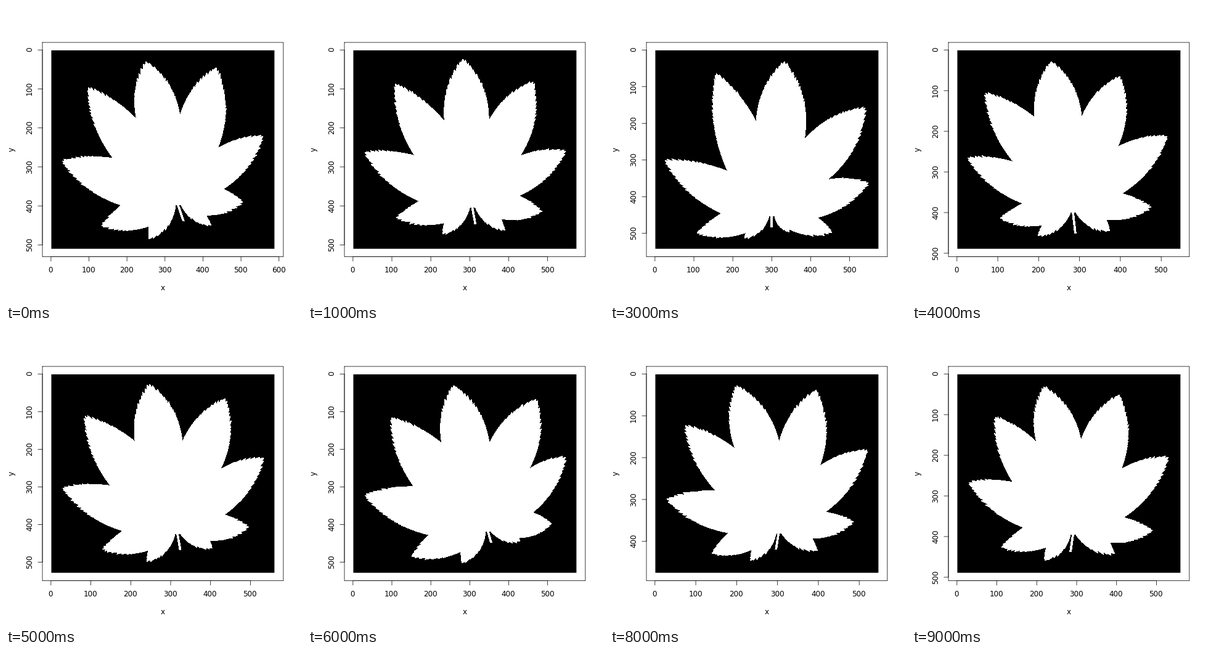
Write a matplotlib script that moves like this. It is 480 px wide and 480 px high and loops after 10 s.

```python
import numpy as np
import matplotlib.pyplot as plt
from matplotlib.animation import ArtistAnimation
from matplotlib.patches import Polygon, Rectangle

SIZE, DPI, INTERVAL = 480, 100, 1000
PX = 72 / DPI                                             # one pixel in points
LEFT, RIGHT, TOP, BOTTOM = 59.04, 449.76, 59.04, 406.56   # plot box
PAD_X, PAD_Y = (RIGHT - LEFT) * 0.04 / 1.08, (BOTTOM - TOP) * 0.04 / 1.08

# Key points of each leaf, clockwise from the left lobe: lobe tip and the notch
# after it, in turn. The stem base is the notch at index STEM; stem end is last.
STEM = 13
A = [(91, 251), (174, 247), (133, 132), (212, 184), (227, 90), (282, 179), (341, 100),
     (343, 231), (417, 211), (352, 297), (384, 318), (324, 339), (333, 356), (279, 323),
     (232, 378), (232, 357), (155, 356), (187, 323), (288, 349)]
B = [(98, 228), (176, 242), (154, 127), (234, 196), (278, 90), (306, 200), (390, 153),
     (345, 260), (419, 263), (333, 320), (375, 349), (303, 351), (308, 372), (256, 331),
     (208, 362), (214, 346), (136, 331), (178, 311), (257, 359)]
C = [(89, 250), (191, 268), (172, 109), (237, 188), (283, 90), (315, 217), (414, 165),
     (352, 282), (419, 287), (336, 343), (360, 367), (291, 362), (291, 367), (262, 341),
     (218, 377), (221, 367), (141, 368), (181, 336), (262, 359)]
D = [(90, 246), (165, 253), (119, 141), (199, 181), (226, 90), (275, 181), (337, 114),
     (333, 229), (414, 211), (340, 304), (388, 326), (315, 346), (321, 365), (261, 335),
     (204, 373), (212, 355), (143, 344), (180, 320), (265, 369)]
E = [(92, 268), (172, 254), (135, 142), (217, 184), (236, 90), (294, 184), (370, 112),
     (358, 226), (418, 206), (364, 296), (395, 314), (342, 337), (344, 343), (292, 327),
     (250, 378), (248, 359), (168, 367), (196, 332), (297, 345)]
F = [(92, 302), (179, 275), (109, 170), (204, 205), (196, 90), (274, 187), (332, 91),
     (340, 217), (417, 184), (354, 287), (399, 297), (335, 332), (343, 352), (285, 328),
     (240, 374), (243, 359), (185, 372), (203, 338), (281, 351)]
G = [(92, 247), (164, 247), (135, 141), (202, 182), (214, 92), (274, 179), (336, 105),
     (339, 226), (416, 206), (343, 304), (390, 325), (320, 344), (329, 363), (261, 332),
     (215, 374), (218, 352), (145, 352), (181, 320), (257, 360)]

# How far each lobe's two edges bow out, as a share of their length.
BOWS = [(0.085, 0.05), (0.08, 0.055), (0.1, 0.11), (0.095, 0.105), (0.07, 0.09),
        (0.04, 0.1), (0, 0.14), (0.15, 0.03), (0.09, 0.02)]


def between(p, q, top, right):
    """Pose halfway between two leaves, fitted to the given extents."""
    x, y = (np.array(p) + np.array(q)).T / 2
    x = np.interp(x, [x.min(), x.max()], [92, right])
    y = np.interp(y, [y.min(), y.max()], [top, y.max()])
    return np.column_stack([x, y])


def edge(tip, notch, bow, side, rng):
    """Bowed edge from tip to notch; the teeth lean to the tip and fade out."""
    chord = notch - tip
    length = np.hypot(*chord)
    along = chord / length
    out = side * np.array([along[1], -along[0]])

    def at(s, depth=0):
        t = s / length
        return tip + along * s + out * (4 * bow * length * t * (1 - t) + depth)

    path, s = [tip], rng.uniform(4, 7)
    while s < length * 0.75:
        fade = min(1, length / 70, 2 - 2.6 * s / length)
        depth = rng.uniform(1.5, 4.5) * fade
        path += [at(s, -0.5 * depth), at(s - 0.5 * depth, 0.5 * depth)]
        s += rng.uniform(4.5, 10)
    path += [at(u) for u in np.linspace(s, length, 8) if s < length]
    return path + [notch]


def leaf(points, seed):
    rng = np.random.default_rng(seed)
    *ring, end = np.array(points, float)
    base, half = ring[STEM], np.array([1.3, 0])
    path = []
    for k, (bow_in, bow_out) in enumerate(BOWS):
        i = 2 * k
        before, tip, after = ring[i - 1], ring[i], ring[i + 1]
        if i + 1 == STEM:
            after = base + (5, 0)
        if i - 1 == STEM:
            path += [base + half, end + half, end - half, base - half]
            before = base - (4, 0)
        path += edge(tip, before, bow_in, -1, rng)[::-1]
        path += edge(tip, after, bow_out, 1, rng)
    return np.array(path)


POSES = [A, between(A, B, 86, 418), B, C, D,
         between(D, E, 88, 418), E, F, between(F, G, 90, 417), G]
WIDTHS = [588, 574, 560, 574, 547, 560, 574, 588, 547, 560]
HEIGHTS = [510, 510, 510, 542, 489, 528, 528, 510, 475, 489]

fig = plt.figure(figsize=(SIZE / DPI, SIZE / DPI), dpi=DPI, facecolor="white")
ax = fig.add_axes([0, 0, 1, 1])
ax.set(xlim=(0, SIZE), ylim=(SIZE, 0))
ax.axis("off")


def line(xs, ys):
    return ax.plot(xs, ys, color="black", lw=0.75 * PX, snap=False,
                   solid_capstyle="round", zorder=4)[0]


def label(x, y, text, angle=0):
    return ax.text(x, y, text, fontsize=12 * PX, family="DejaVu Sans", color="black",
                   ha="center", va="baseline", rotation=angle, rotation_mode="anchor")


def ticks(lo, hi, count):
    """Pixel position and value of each tick for an image of count pixels."""
    step = (hi - lo) / (count - 1)
    values = range(0, int(count + 0.04 * (count - 1)) + 1, 100)
    return [(lo + (v - 1) * step, str(v)) for v in values]


def scene(i):
    items = [ax.add_patch(Polygon(leaf(POSES[i], 20 + i), closed=True, fc="white",
                                  ec="none", aa=False, zorder=2))]
    across = ticks(LEFT + PAD_X, RIGHT - PAD_X, WIDTHS[i])
    down = ticks(TOP + PAD_Y, BOTTOM - PAD_Y, HEIGHTS[i])
    items += [line([across[0][0], across[-1][0]], [BOTTOM, BOTTOM]),
              line([LEFT, LEFT], [down[0][0], down[-1][0]])]
    for x, text in across:
        items += [line([x, x], [BOTTOM, BOTTOM + 7.2]), label(x - 0.6, 432, text)]
    for y, text in down:
        items += [line([LEFT - 7.2, LEFT], [y, y]), label(42, y - 0.6, text, 90)]
    return items


ax.add_patch(Rectangle((LEFT + PAD_X, TOP + PAD_Y), RIGHT - LEFT - 2 * PAD_X,
                       BOTTOM - TOP - 2 * PAD_Y, fc="black", ec="none",
                       snap=False, zorder=1))
line([LEFT, RIGHT, RIGHT, LEFT, LEFT], [TOP, TOP, BOTTOM, BOTTOM, TOP])
label((LEFT + RIGHT) / 2 - 0.6, 461.4, "x")
label(13, (TOP + BOTTOM) / 2 - 0.6, "y", 90)

anim = ArtistAnimation(fig, [scene(i) for i in range(len(POSES))], interval=INTERVAL,
                       repeat=True, repeat_delay=0, blit=False)
plt.show()
```
